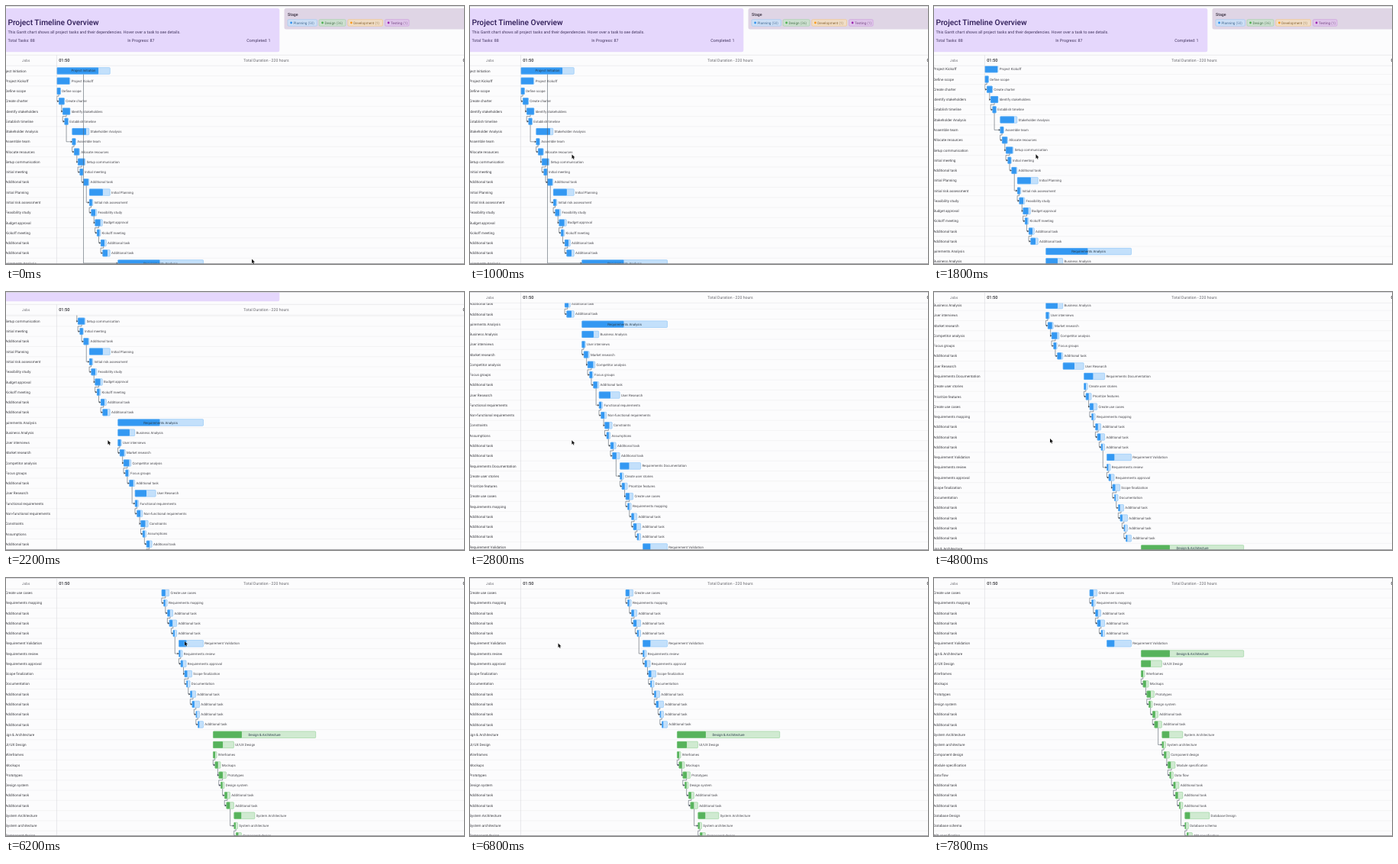
Recreate the animation shown at these times as an HTML page. Size 600x338 px, loop 8 s.

```html
<!DOCTYPE html>
<html lang="en">
<head>
<meta charset="utf-8">
<title>Project timeline</title>
<style>
  html, body { margin: 0; width: 100%; height: 100%; overflow: hidden; background: #fcfcfd; }
  svg { display: block; width: 100vw; height: 100vh; }
  text { font-family: Roboto, Arial, sans-serif; text-rendering: geometricPrecision; white-space: pre; }
</style>
</head>
<body>
<svg id="stage" viewBox="0 0 600 338"></svg>
<script>
const LOOP = 8000, STEP = 200;
const ROW = 13.265, BAR = 9, UNIT = 2.495, LEFT = 66.6;
const HEAD_TOP = 64.3, HEAD_HEIGHT = 14;

const BLUE = { fill: '#c3e0fb', edge: '#86c0f4', done: '#3398f2' };
const GREEN = { fill: '#d0ead1', edge: '#8fce93', done: '#57b35c' };

// Groups: name, start unit, progress, number of children, named children
const phases = [
  { name: 'Project Initiation', start: 0, size: 28, progress: .78, colors: BLUE, groups: [
    ['Project Kickoff', 0, .95, 4, 'Define scope,Create charter,Identify stakeholders,Establish timeline'],
    ['Stakeholder Analysis', 8, .82, 5, 'Assemble team,Allocate resources,Setup communication,Initial meeting'],
    ['Initial Planning', 17, .65, 6, 'Initial risk assessment,Feasibility study,Budget approval,Kickoff meeting']] },
  { name: 'Requirements Analysis', start: 32, size: 45, progress: .49, colors: BLUE, groups: [
    ['Business Analysis', 32, .69, 5, 'User interviews,Market research,Competitor analysis,Focus groups'],
    ['User Research', 41, .55, 6, 'Functional requirements,Non-functional requirements,Constraints,Assumptions'],
    ['Requirements Documentation', 52, .44, 7, 'Create user stories,Prioritize features,Create use cases,Requirements mapping'],
    ['Requirement Validation', 64, .31, 8, 'Requirements review,Requirements approval,Scope finalization,Documentation']] },
  { name: 'Design & Architecture', start: 82, size: 54, progress: .28, colors: GREEN, groups: [
    ['UI/UX Design', 82, .47, 6, 'Wireframes,Mockups,Prototypes,Design system'],
    ['System Architecture', 93, .35, 7, 'System architecture,Component design,Module specification,Data flow'],
    ['Database Design', 105, .21, 8, 'Database schema,API specification']] }
];
const childStart = [0, 1, 3, 4, 6, 7, 9, 10];
const childSize = [2, 3, 4, 2, 3, 4, 2, 3];

const collapseAt = { 'User Research': 4200, 'Requirement Validation': 7600 };

// time, page scroll, chart scroll
const scrollKeys = [
  [0, 0, 0], [1400, 0, 0], [1600, 0, 4], [1800, 0, 15.4], [2000, 20, 62], [2200, 48, 118],
  [2400, 64, 167], [2600, 64, 204], [2800, 64, 230.8], [3000, 64, 247], [3200, 64, 258],
  [3400, 64, 264.5], [3600, 64, 268], [3800, 64, 268.7], [4800, 64, 268.7], [5000, 64, 290],
  [5200, 64, 335], [5400, 64, 370], [5600, 64, 389], [5800, 64, 397], [6000, 64, 399.4]
];
// time, pointer x, pointer y
const pointerKeys = [
  [0, 322, 331.5], [200, 310, 322], [1000, 133.5, 194.5], [3600, 133.3, 194],
  [4200, -3, 96], [4400, -3, 96], [4800, 152, 192], [5400, 152, 192],
  [6200, 234, 83], [6400, 234, 83], [7200, -3, 88]
];

const stage = document.getElementById('stage');

function add(parent, tag, attrs, text) {
  const node = document.createElementNS('http://www.w3.org/2000/svg', tag);
  for (const key in attrs) node.setAttribute(key, attrs[key]);
  if (text) node.textContent = text;
  parent.appendChild(node);
  return node;
}
const rect = (parent, x, y, width, height, fill, more) =>
  add(parent, 'rect', { x, y, width, height, fill, ...more });
const line = (parent, x1, y1, x2, y2, stroke) =>
  add(parent, 'line', { x1, y1, x2, y2, stroke, 'stroke-width': .5 });
const write = (parent, text, x, y, size, fill, more) =>
  add(parent, 'text', { x, y, dy: '.35em', 'font-size': size, fill, ...more }, text);
const move = (node, x, y) => node.setAttribute('transform', `translate(${x} ${y})`);

function sample(keys, t) {
  const next = keys.findIndex(key => key[0] > t);
  if (next < 0) return keys[keys.length - 1].slice(1);
  const a = keys[next - 1], b = keys[next], k = (t - a[0]) / (b[0] - a[0]);
  return a.slice(1).map((v, i) => v + (b[i + 1] - v) * k);
}

rect(stage, 0, 0, 600, 338, '#fcfcfd');
const rowLayer = add(stage, 'g');
const linkLines = add(stage, 'path', { fill: 'none', stroke: '#56606a', 'stroke-width': .6 });
const linkHeads = add(stage, 'path', { fill: '#3f4a55' });
const page = add(stage, 'g');

const rows = [], links = [];

function addRow(level, name, start, size, progress, colors, group) {
  const x = LEFT + start * UNIT, width = size * UNIT, top = -BAR / 2;
  const node = add(rowLayer, 'g');
  line(node, 0, ROW / 2, 600, ROW / 2, '#e9e9eb');
  write(node, name, level ? -.7 : -7.2, 0, 4.63, '#3b3b40');
  rect(node, x, top, width, BAR, colors.fill, { rx: 1 });
  rect(node, x, top, width * progress, BAR, colors.done, { rx: 1 });
  rect(node, x + .2, top + .2, width - .4, BAR - .4, 'none', { rx: 1, stroke: colors.edge, 'stroke-width': .5 });
  if (level) write(node, name, x + width + 1.6, 0, 4.41, '#4a4a50');
  else write(node, name, x + width / 2, 0, 4.41, '#2b3d4c', { 'text-anchor': 'middle' });
  const row = { node, x, center: x + width / 2, group };
  rows.push(row);
  return row;
}

let lastPhase;
for (const phase of phases) {
  const top = addRow(0, phase.name, phase.start, phase.size, phase.progress, phase.colors);
  if (lastPhase) links.push([lastPhase, top]);
  lastPhase = top;
  let lastTask;
  for (const [name, start, progress, count, named] of phase.groups) {
    const names = named.split(',');
    const size = Math.max(...childStart.slice(0, count).map((s, i) => s + childSize[i]));
    addRow(1, name, start, size, progress, phase.colors);
    for (let i = 0; i < count; i++) {
      const done = Math.min(1, progress + .1 - i * .02);
      const task = addRow(2, names[i] || 'Additional task', start + childStart[i], childSize[i], done, phase.colors, name);
      if (lastTask) links.push([lastTask, task]);
      lastTask = task;
    }
  }
}

function drawPage() {
  rect(page, 0, -20, 600, HEAD_TOP + HEAD_HEIGHT + 20, '#fcfcfd');
  rect(page, -10, 3, 368.3, 57.3, '#e5d7fc', { rx: 2.5 });
  write(page, 'Project Timeline Overview', 2.4, 21.4, 10.25, '#2c1a55', { 'font-weight': 500 });
  const ink = '#43355f';
  write(page, 'This Gantt chart shows all project tasks and their dependencies. Hover over a task to see details.', 2.4, 34.6, 5.29, ink);
  write(page, 'Total Tasks: 88', 2.4, 44.8, 5.29, ink);
  write(page, 'In Progress: 87', 159.2, 44.8, 5.29, ink);
  write(page, 'Completed: 1', 346.5, 44.8, 5.29, ink, { 'text-anchor': 'end' });

  rect(page, 364.5, 3, 246, 27.5, '#dfd5e5', { rx: 2.5 });
  write(page, 'Stage', 369, 11, 5.29, '#3a3142', { 'font-weight': 500 });
  const chips = [
    ['Planning', 50, 369, 38.5, '#cddff5', '#92c0ee', '#2f92ef', '#3f6690'],
    ['Design', 36, 410, 35, '#cde0d0', '#92cb96', '#4caf50', '#47704a'],
    ['Development', 1, 447.8, 45.7, '#f0ddc6', '#f3bd6c', '#fb991c', '#8a6534'],
    ['Testing', 1, 496.5, 31.5, '#dfc6ea', '#c78ad8', '#9c27b0', '#71417f']
  ];
  for (const [name, count, x, width, fill, stroke, dot, color] of chips) {
    rect(page, x, 17.7, width, 8.6, fill, { rx: 1.4, stroke, 'stroke-width': .5 });
    add(page, 'circle', { cx: x + 4.6, cy: 22, r: 1.4, fill: dot });
    const label = write(page, name + ' ', x + 7.4, 22, 4.63, color);
    add(label, 'tspan', { opacity: .75 }, `(${count})`);
  }

  const mid = HEAD_TOP + HEAD_HEIGHT / 2 - .1;
  line(page, 0, HEAD_TOP, 600, HEAD_TOP, '#d6d6da');
  line(page, 0, HEAD_TOP + HEAD_HEIGHT, 600, HEAD_TOP + HEAD_HEIGHT, '#dcdce0');
  line(page, LEFT - .2, HEAD_TOP, LEFT - .2, 420, '#d2d2d6');
  write(page, 'Jobs', 26.2, mid, 4.63, '#66666c', { 'text-anchor': 'middle' });
  write(page, '01:50', 69.2, mid, 5.6, '#2e2e33', { 'font-weight': 500 });
  write(page, 'Total Duration - 220 hours', 341, mid, 5.2, '#66666c', { 'text-anchor': 'middle' });
  write(page, '01:50', 598.4, mid, 5.6, '#2e2e33', { 'font-weight': 500 });
}
drawPage();

rect(stage, 0, 0, 600, .8, '#d3d3d6');
rect(stage, 0, 337.2, 600, .8, '#8e8e92');
const pointer = add(stage, 'path', {
  d: 'M0 0V5.6L1.3 4.4L2.2 6.4L3.1 6L2.2 4.1H4Z',
  fill: '#111', stroke: '#fff', 'stroke-width': .5, 'paint-order': 'stroke'
});

function drawLinks(headBottom) {
  const seen = row => row.shown && row.y + ROW / 2 > headBottom && row.y - ROW / 2 < 338;
  let lines = '', heads = '';
  for (const [from, to] of links) {
    if (!seen(from) || !seen(to)) continue;
    lines += `M${from.center} ${from.y + BAR / 2}`;
    if (to.x - from.center < 1) lines += `V${(from.y + ROW / 2)}H${to.x - 2.4}`;
    lines += `V${to.y}H${to.x}`;
    heads += `M${to.x + .2} ${to.y}l-2 -1.4v2.8Z`;
  }
  linkLines.setAttribute('d', lines);
  linkHeads.setAttribute('d', heads);
}

function render(t) {
  const [pageScroll, chartScroll] = sample(scrollKeys, t);
  const headBottom = HEAD_TOP + HEAD_HEIGHT - pageScroll;
  let y = headBottom + ROW / 2 - chartScroll;
  for (const row of rows) {
    row.shown = !(t >= collapseAt[row.group]);
    row.node.style.display = row.shown ? '' : 'none';
    if (!row.shown) continue;
    row.y = y;
    move(row.node, 0, y);
    y += ROW;
  }
  drawLinks(headBottom);
  move(page, 0, -pageScroll);
  move(pointer, ...sample(pointerKeys, t));
}

const began = performance.now();
let shownStep = -1;
function tick() {
  const t = Math.max(0, performance.now() - began) % LOOP;
  const step = Math.floor(t / STEP);
  if (step !== shownStep) render((shownStep = step) * STEP);
  requestAnimationFrame(tick);
}
tick();
</script>
</body>
</html>
```
